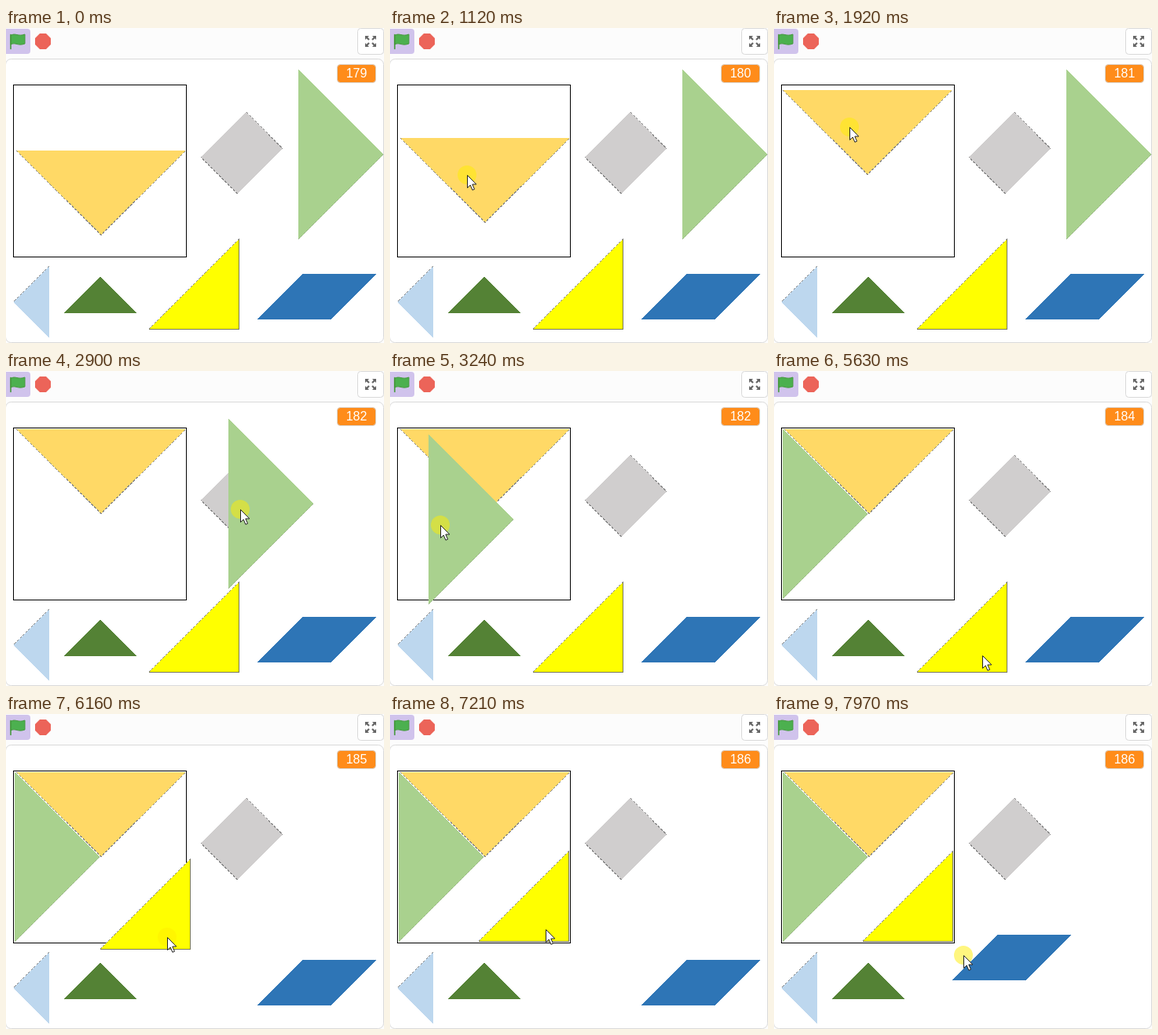
Animation of 481x401 px, one loop 8000 ms. Source, as an HTML page:

```html
<!DOCTYPE html>
<html lang="en">
<head>
<meta charset="utf-8">
<title>Tangram puzzle</title>
<style>
  html, body { margin: 0; width: 100%; height: 100%; overflow: hidden; background: #fcfcfc; }
  svg { display: block; }
  #pieces { shape-rendering: crispEdges; }
  .edge { fill: none; stroke: #858585; stroke-dasharray: 3 2; }
  .line { fill: none; stroke: #77775a; }
  #count { font: 16px "Liberation Sans", Arial, sans-serif; fill: #fff; text-anchor: middle; }
</style>
</head>
<body>
<svg width="481" height="401" viewBox="0 0 481 401">
  <!-- toolbar -->
  <path d="M0 1h27a4 4 0 0 1 4 4v24a4 4 0 0 1-4 4H0z" fill="#d0c3ec"/>
  <path d="M6 9.500c6-4 9 2 18-1.500v12c-9 3.500-12-2.500-18 1z" fill="#4cb04f" stroke="#45993d" stroke-linejoin="round"/>
  <path d="M6 8.500v18" stroke="#45993d" stroke-width="1.600" stroke-linecap="round"/>
  <path d="M43 7h8l6 6v8l-6 6h-8l-6-6v-8z" fill="#ec6459"/>
  <rect x="447.500" y=".5" width="33" height="33" rx="4" fill="#fff" stroke="#d9d9d9"/>
  <g transform="translate(464 17)" fill="#666">
    <path id="arrow" d="M-7-7h5l-1.700 1.700 2.500 2.500-1.600 1.600-2.500-2.500L-7-2z"/>
    <use href="#arrow" transform="rotate(90)"/>
    <use href="#arrow" transform="rotate(180)"/>
    <use href="#arrow" transform="rotate(270)"/>
  </g>

  <!-- stage -->
  <rect x="-.5" y="39.500" width="481" height="361" rx="7" fill="#fff" stroke="#d9d9d9"/>
  <rect x="9.500" y="72.500" width="220" height="219" fill="none" stroke="#000"/>

  <g id="pieces">
    <path d="M306 107l46 46.500-57.500 57.500-46.500-46.500z" fill="#d0cece"/>
    <path class="edge" d="M306 107l46 46.500M294.500 211l-46.500-46.500"/>
    <path d="M55 303v92l-46-46z" fill="#bdd7ee"/>
    <path class="edge" d="M55 303l-46 46"/>
    <path d="M120 317l46.500 46h-93z" fill="#548235"/>
    <g id="sand">
      <path d="M13 156h216l-108 107.500z" fill="#ffd966"/>
      <path class="edge" d="M13 156l108 107.500 108-107.500"/>
    </g>
    <g id="green">
      <path d="M372 53l108 108-108 108z" fill="#a9d18e"/>
      <path class="edge" d="M480 161l-108 108" opacity=".4"/>
    </g>
    <g id="yellow">
      <path d="M297 268v116H181z" fill="#ff0"/>
      <path class="edge" d="M297 268L181 384"/>
      <path class="line" d="M296.500 268.500v115H182"/>
    </g>
    <path id="blue" d="M377.500 313h94l-57.500 58h-94.500z" fill="#2e75b6"/>
  </g>

  <!-- timer -->
  <rect x="421.500" y="46.500" width="49" height="23" rx="4" fill="#ff8c1a" stroke="#d9d0c8"/>
  <text id="count" x="446" y="63">179</text>

  <g id="pointer" visibility="hidden">
    <circle id="glow" r="12" fill="#fe0" opacity=".5"/>
    <path d="M.5.500v16l3.700-3.500 2.700 6.300 2.600-1.100-2.700-6.200h5z" fill="#fff" stroke="#222"/>
  </g>
</svg>
<script>
const LOOP = 8000, STEP = 200 / 3, ENTER = 250;
const el = id => document.getElementById(id);

// Where the pointer rests: [arrive, leave, x, y]
const stops = [
  [0, ENTER, 150, 401],
  [820, 820, 98, 203], [1780, 2030, 96, 126], [2200, 2270, 98, 121],
  [2700, 2730, 387, 168], [3240, 3240, 64, 196], [3890, 4500, 29, 192], [4640, 4800, 26, 189],
  [5620, 5645, 265, 362], [5700, 5700, 267, 368], [6290, 7310, 198, 274],
  [7640, 7640, 334, 339], [7970, LOOP, 241, 307]
];
// When the button is held on each piece
const drags = { sand: [820, 2250], green: [2730, 4640], yellow: [5700, 7150], blue: [7640, LOOP] };

function pointer(t) {
  const i = stops.findLastIndex(s => s[0] <= t);
  const [, leave, x, y] = stops[i];
  if (t <= leave || i === stops.length - 1) return [x, y];
  const [arrive, , nx, ny] = stops[i + 1];
  const u = (t - leave) / (arrive - leave), e = u * u * (3 - 2 * u);
  return [x + (nx - x) * e, y + (ny - y) * e];
}

function place(id, x, y) {
  el(id).setAttribute("transform", `translate(${Math.round(x)} ${Math.round(y)})`);
}

function draw(now) {
  // The screen refreshes 15 times a second
  const t = Math.max(0, 240 + STEP * Math.floor((now % LOOP - 205) / STEP));
  let held = false;
  for (const [id, [from, to]] of Object.entries(drags)) {
    const [gx, gy] = pointer(from);
    const [x, y] = pointer(Math.min(Math.max(t, from), to));
    place(id, x - gx, y - gy);
    held ||= t >= from && t < to;
  }
  place("pointer", ...pointer(t));
  el("pointer").setAttribute("visibility", t > ENTER ? "visible" : "hidden");
  el("glow").style.display = held ? "" : "none";
  el("count").textContent = 179 + Math.floor((t + 505) / 1065);
}

const start = performance.now();
(function tick() {
  draw(performance.now() - start);
  requestAnimationFrame(tick);
})();
</script>
</body>
</html>
```
